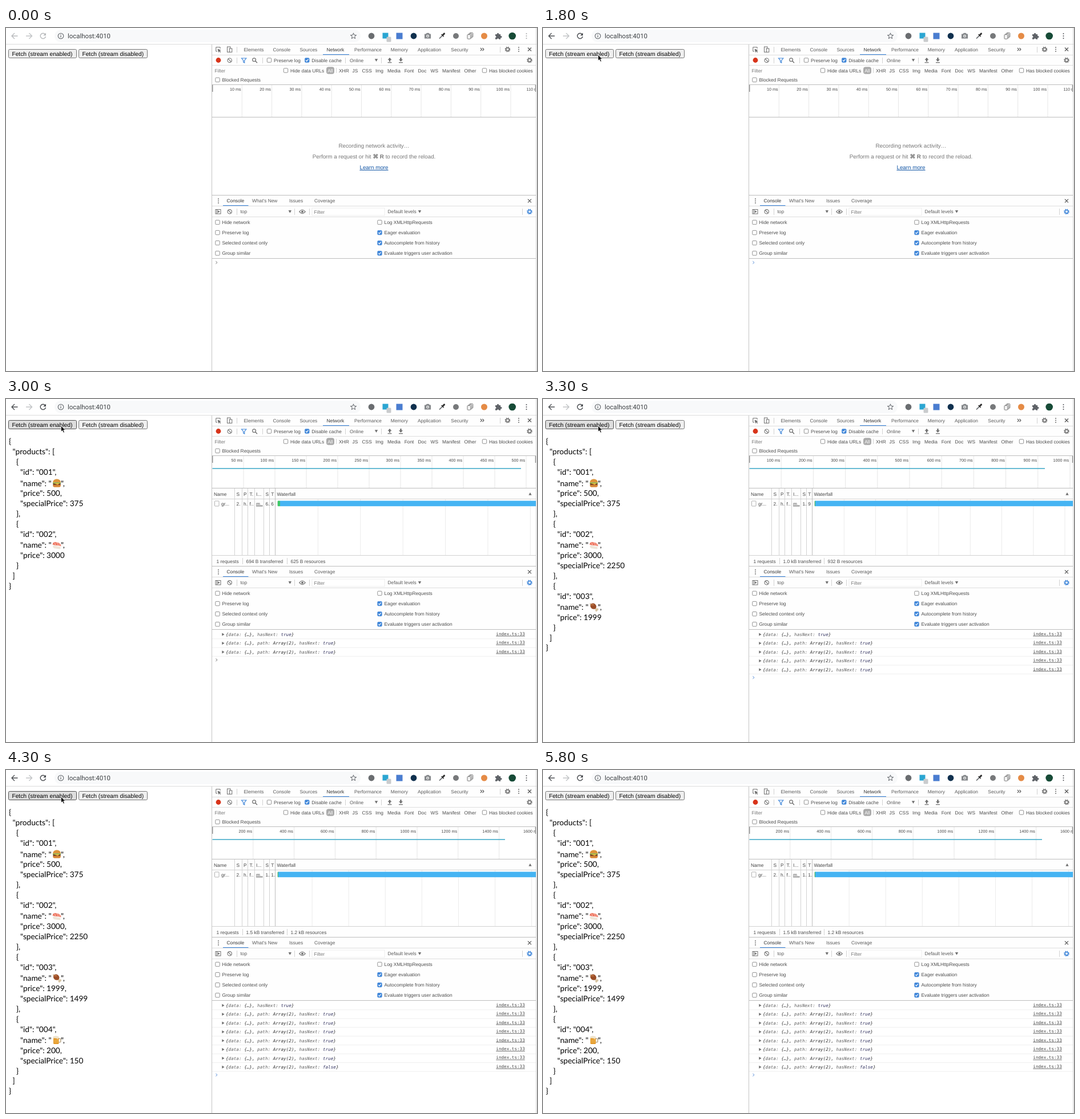
An HTML page for the animation above (6.2 s loop, 930 by 602 pixels).

```html
<!DOCTYPE html>
<html lang="en">
<head>
<meta charset="utf-8">
<title>Streamed fetch</title>
<style>
html, body { margin: 0; width: 100%; height: 100%; overflow: hidden; background: #fff; }
svg { display: block; width: 930px; height: 602px; }
text { font-family: "Liberation Sans", Arial, sans-serif; text-rendering: geometricPrecision; white-space: pre; }
.json { font-family: Lato, "Noto Sans", sans-serif; }
.url { font-family: Roboto, sans-serif; }
.mono { font-family: "DejaVu Sans Mono", monospace; }
</style>
</head>
<body>
<svg id="stage" viewBox="0 0 930 602" xmlns="http://www.w3.org/2000/svg">
  <g id="base"></g>
  <g id="nav" fill="none" stroke-width="1.4"></g>
  <g id="button"></g>
  <g id="net"></g>
  <g id="json"></g>
  <g id="log"></g>
  <path id="cursor" d="M0 0V10.4L2.4 8.2L4.2 12.2L6 11.4L4.3 7.5H7.5Z" stroke="#fff" stroke-width=".8"/>
</svg>
<script>
const LOOP = 6200, BAR = '#fefefe', LINE = '#d2d2d2', ICON = '#6e6e6e', BLUE = '#3f86d9';
const $ = id => document.getElementById(id);

// Drawing helpers
const text = (x, cy, s, size = 8.4, fill = '#5a5a5a', more = '') =>
  `<text x="${x}" y="${cy + size * .36}" font-size="${size}" fill="${fill}" ${more}>${s}</text>`;
const rect = (x, y, w, h, fill, more = '') =>
  `<rect x="${x}" y="${y}" width="${w}" height="${h}" fill="${fill}" ${more}/>`;
const disc = (x, y, r, fill, more = '') =>
  `<circle cx="${x}" cy="${y}" r="${r}" fill="${fill}" ${more}/>`;
const ring = (x, y, r, c, w = 1.1, more = '') =>
  disc(x, y, r, 'none', `stroke="${c}" stroke-width="${w}" ${more}`);
const line = (d, c = ICON, w = 1.1, more = '') =>
  `<path d="${d}" fill="none" stroke="${c}" stroke-width="${w}" ${more}/>`;
const shape = (d, fill = ICON) => `<path d="${d}" fill="${fill}"/>`;
const hline = (y, c = LINE, x = 361, x2 = 928) => line(`M${x} ${y}H${x2}`, c, 1);
const vline = (x, y, y2, c = LINE) => line(`M${x} ${y}V${y2}`, c, 1);

const gear = (x, y, c) => ring(x, y, 2.8, c, 1.6) + ring(x, y, 4.2, c, 1.3, 'stroke-dasharray="1.7 1.6"');
const dots = (x, y, c = ICON, gap = 3.4) => [-gap, 0, gap].map(d => disc(x, y + d, 1, c)).join('');
const cross = (x, y) => line(`M${x - 3} ${y - 3}l6 6m0 -6l-6 6`, '#555', 1.2);
const block = (x, y) => ring(x, y, 3.7, ICON) + line(`M${x - 2.6} ${y - 2.6}l5.2 5.2`);
const down = (x, y) => shape(`M${x - 2.7} ${y - 2.2}h5.4l-2.7 4.6z`);
const check = (x, y, label, on) =>
  rect(x - 3.7, y - 3.7, 7.4, 7.4, on ? BLUE : '#fff', `rx="1.3" stroke="${on ? BLUE : '#767676'}" stroke-width=".8"`) +
  (on ? line(`M${x - 2.2} ${y}l1.6 1.8l2.8 -3.6`, '#fff', 1.2) : '') +
  text(x + 8, y, label, 8.4, '#4c4c4c');
const button = (x, w, label, hot) =>
  rect(x, 37.5, w, 15, hot ? '#dedede' : '#efefef', `rx="2" stroke="${hot ? '#4f4f4f' : '#767676'}" stroke-width="1"`) +
  text(x + 5.9, 45.1, label, 10.25, '#000');

function browserBar() {
  let s = rect(0, 0, 930, 28, '#fff') + rect(85, 3, 536, 22, '#f8f9fa', 'rx="11"') +
    hline(28.5, '#dcdcdc', 0, 930) +
    ring(96, 14, 4.8, '#5f6368', 1.1) + line('M96 13.2v3.4M96 11v1.2', '#5f6368', 1.2) +
    text(108, 14, 'localhost:4010', 11.4, '#3c4043', 'class="url"');
  let star = '';
  for (let i = 0; i < 10; i++) {
    const a = i * Math.PI / 5, r = i % 2 ? 2.3 : 5.4;
    star += (i ? 'L' : 'M') + (608.5 + r * Math.sin(a)).toFixed(2) + ' ' + (14.2 - r * Math.cos(a)).toFixed(2);
  }
  s += line(star + 'Z', '#5f6368', 1);
  s += disc(640, 14, 5.4, '#6a6d70') + rect(659.5, 8.5, 10, 10, '#2ba6d2') +
    rect(666.5, 15.5, 8, 9, '#c9cbcd', 'rx="1.5"') + rect(683.5, 8.5, 11, 11, '#4a7dd0') +
    disc(714, 14, 5.4, '#10304e');
  s += shape('M733 10.5h2.5l1.2 -1.7h4l1.2 1.7h2.2v8h-11.1z', '#85888b') +
    disc(738.6, 14.2, 2.4, '#fff') + disc(738.6, 14.2, 1.2, '#85888b');
  s += line('M759 18.5l5.5 -5.5', '#5f6368', 1.6) + line('M762.5 11l4.2 4.2', '#333', 1.4) +
    line('M765.2 12.2l2.3 -2.3', '#333', 3, 'stroke-linecap="round"');
  s += disc(788, 14, 5, '#77797b');
  for (let i = 2; i >= 0; i--)
    s += rect(808 + i * 2, 11.6 - i * 1.6, 5.8, 7.6, '#f4f4f4', 'rx="1" stroke="#777" stroke-width="1"');
  s += disc(837.5, 14, 5.5, '#e58b46');
  s += shape('M857 11h3v-.7a1.6 1.6 0 0 1 3.2 0v.7h3v3h.8a1.6 1.6 0 0 1 0 3.2h-.8v2.6h-3a1.5 1.5 0 0 0 -3 0h-3.2v-3a1.5 1.5 0 0 0 0 -3z', '#5f6368');
  return s + disc(886.7, 14, 6.3, '#174b37');
}

function devtools() {
  let s = rect(361, 29, 567, 71, BAR) + rect(361, 294, 567, 110, BAR);
  s += vline(360.5, 29, 602, '#c4c4c4') + vline(928.8, 0, 602, '#c8c8c8');
  s += [47.5, 65.5, 312.5, 331.5].map(y => hline(y, '#dedede')).join('');
  s += [99.5, 156.5, 293.5, 404.5].map(y => hline(y, '#bdbdbd')).join('');

  // Main tabs
  s += line('M370 41h-2.2v-7.3h7.3v2.5', ICON, 1) + shape('M370.5 36.5l6.4 2.6l-2.6 1l2 2l-1 1l-2 -2l-1 2.4z') +
    rect(387.5, 33, 5.5, 9.3, 'none', `stroke="${ICON}"`) + rect(391.3, 36, 4.5, 6.3, BAR, `stroke="${ICON}"`) +
    vline(404.5, 33, 43);
  const tabs = { Elements: 416.5, Console: 467.5, Sources: 514.5, Network: 561.5, Performance: 610, Memory: 673.7, Application: 721, Security: 779.3 };
  for (const k in tabs) s += text(tabs[k], 37.5, k, 8.4, k === 'Network' ? '#333' : '#5a5a5a');
  s += rect(555, 46, 46, 1.1, BLUE) + line('M831 35l2.4 2.5l-2.4 2.5M834.5 35l2.4 2.5l-2.4 2.5', '#555') +
    vline(865.5, 33, 43) + gear(878.5, 37.5, ICON) + dots(898, 37.5) + cross(917, 37.5);

  // Network toolbar
  s += disc(372, 56.5, 4.4, '#d8341a') + block(391.7, 56.7) + vline(404.5, 52, 62) +
    line('M412.6 53h8.2l-3.1 4v4l-2 -1.2v-2.8z', BLUE, 1.2) +
    ring(434.6, 55.8, 2.9, ICON, 1.2) + line('M436.8 58l3.2 3.2', ICON, 1.5) + vline(449.5, 52, 62) +
    check(461, 56.5, 'Preserve log') + check(527.3, 56.5, 'Disable cache', true) + vline(594.5, 52, 62) +
    text(602, 56.7, 'Online') + down(648.5, 56.5) + vline(657.5, 52, 62) +
    shape('M672 52l3.4 4h-2.2v3h-2.4v-3h-2.2zM668.5 60h7v1.2h-7z') +
    shape('M691.5 59l3.4 -4h-2.2v-3h-2.4v3h-2.2zM688 60h7v1.2h-7z') + gear(917, 56.5, ICON);

  // Filters
  s += text(365.5, 75, 'Filter', 8.4, '#777') + check(490, 74.5, 'Hide data URLs') +
    rect(561, 68.3, 14, 12.4, '#ababab', 'rx="4"') + text(563.2, 74.5, 'All', 8.4, '#fff') + vline(578.5, 70, 79);
  const kinds = { XHR: 583, JS: 606.5, CSS: 623.5, Img: 647, Media: 668, Font: 697.7, Doc: 721.5, WS: 743.5, Manifest: 764, Other: 802.5 };
  for (const k in kinds) s += text(kinds[k], 74.5, k, 8.4, '#4c4c4c');
  s += check(838, 74.5, 'Has blocked cookies') + check(370.5, 91, 'Blocked Requests');

  // Drawer
  s += dots(372, 303.5) + text(386.5, 303, 'Console', 8.4, '#333') + text(431, 303, "What's New") +
    text(496, 303, 'Issues') + text(540, 303, 'Coverage') + rect(380, 311, 44.5, 1.1, BLUE) + cross(917, 303.3) +
    rect(367, 318.5, 9, 7.6, 'none', `stroke="${ICON}"`) + line('M369.5 318.5v7.6') + shape('M371 320l3.6 2.3l-3.6 2.3z') +
    block(391.7, 322.3) + vline(404.5, 317, 328) + text(410.5, 322.3, 'top') + down(497.3, 322.3) + vline(505.5, 317, 328) +
    line('M513.8 322.3q5 -6.6 10.4 0q-5.2 6.6 -10.4 0z', ICON, 1.2) + disc(519, 322.3, 1.9, ICON) + vline(531.5, 317, 328) +
    rect(536, 316, 127, 13, '#fff', 'stroke="#e8e8e8" stroke-width=".8"') + text(539.5, 322.6, 'Filter', 8.4, '#777') +
    text(668.5, 322.3, 'Default levels') + down(724.5, 322.3) + vline(904.5, 317, 328) + gear(917, 322.3, BLUE);
  ['Hide network', 'Preserve log', 'Selected context only', 'Group similar'].forEach((k, i) =>
    s += check(370.5, 341 + i * 18.1, k));
  ['Log XMLHttpRequests', 'Eager evaluation', 'Autocomplete from history', 'Evaluate triggers user activation'].forEach((k, i) =>
    s += check(654.5, 341 + i * 18.1, k, i > 0));
  return s;
}

// Network panel
const ruler = (unit, gap) => {
  let s = '<clipPath id="clip"><rect x="361" y="100" width="566" height="56"/></clipPath><g clip-path="url(#clip)">';
  for (let i = 1; i * gap < 620; i++) {
    const x = 361 + i * gap;
    s += vline(x.toFixed(1), 100, 156, '#e6e6e6') + text(x - 1.8, 107.3, unit * i + ' ms', 7.2, '#444', 'text-anchor="end"');
  }
  return s + '</g>' + rect(361, 100, 1.5, 12, '#999') + rect(926.7, 100, 1.5, 12, '#999');
};

function idlePanel() {
  const mid = 'text-anchor="middle"';
  return ruler(10, 52.3) + text(644.5, 206, 'Recording network activity…', 9.8, '#777', mid) +
    text(644.5, 225.3, 'Perform a request or hit <tspan font-weight="bold">⌘ R</tspan> to record the reload.', 9.8, '#777', mid) +
    text(644.5, 244.5, 'Learn more', 9.8, '#1155a5', mid + ' text-decoration="underline"');
}

function requestPanel(p) {
  const bar = (x, w, c) => rect(x, 178.6, w, 9.6, c);
  let s = ruler(p.unit, p.gap);
  if (p.unit === 10) s += rect(362, 121.3, 10, 1.3, '#c4c4c4') + rect(372, 121.3, 26, 1.4, '#3fc46e') + rect(398, 121.3, 14, 1.4, '#45aee8');
  else s += rect(361.5, 121.2, p.end - 361.5, 1.6, '#45acca');

  s += rect(361, 157, 567, 18, BAR) + rect(361, 275, 567, 18, BAR) + hline(175.5) + hline(274.5);
  for (let x = 472 + p.grid; x < 927; x += p.grid) s += vline(x.toFixed(1), 176, 274, '#ebebeb');
  [400.5, 413.5, 423.5, 435.5, 451.5, 461.5].forEach(x => s += vline(x, 157, 274));
  s += vline(471.5, 157, 274, '#bdbdbd');

  const cols = [364, 403.5, 416, 426.5, 438, 454.5, 464.3];
  ['Name', 'S', 'P', 'T.', 'I...', 'S', 'T'].forEach((k, i) => s += text(cols[i], 166.5, k, 8.4, '#444'));
  s += text(474.5, 166.5, 'Waterfall', 8.4, '#444') + shape('M915.4 168.7h5.2l-2.6 -4.6z');
  s += rect(365.5, 179, 7.5, 9, '#fff', 'stroke="#aaa" stroke-width=".9" rx=".8"');
  ['gr...', '2.', 'h.', 'f..', 'm..', p.size, p.time].forEach((k, i) =>
    s += text(i ? cols[i] : 377, 183.5, k, 8.4, '#444', i === 4 ? 'text-decoration="underline"' : ''));

  if (p.unit === 10)
    s += rect(475, 181, 9.5, 5, '#fff', 'stroke="#ddd" stroke-width=".8"') + rect(485, 181, 1, 5, '#999') +
      bar(487, 19.5, '#3dcb68') + bar(506.5, 13.5, '#45b4f3');
  else
    s += rect(475.3, 179.5, 1, 8, '#bbb') + bar(476, p.green, '#3dcb68') + bar(476 + p.green, 452 - p.green, '#45b4f3');

  return s + text(368.5, 284.5, '1 requests', 8.4, '#4c4c4c') + vline(414.5, 279, 290) +
    text(420.5, 284.5, p.sent + ' transferred', 8.4, '#4c4c4c') + vline(492.5, 279, 290) +
    text(498.5, 284.5, p.body + ' resources', 8.4, '#4c4c4c');
}

// Food pictures, drawn around 0,0
const food = [
  shape('M-7 -1C-6.5 -9 6.5 -9 7 -1z', '#dd943a') + rect(-7.2, -1.2, 14.4, 2, '#7dab3c', 'rx="1"') +
    rect(-6.8, .6, 13.6, 2.7, '#6c3a20', 'rx="1.3"') + shape('M-5 .4h10l-3.5 2.4z', '#f5c242') +
    shape('M-7 3.2h14q0 4 -3 4h-8q-3 0 -3 -4z', '#d9893a'),
  shape('M-6 0L6 3q1.5 2 -.5 4L-5 5.5q-3 -2.5 -1 -5.5z', '#eee6da') +
    shape('M-7.5 -1q1 -5 6 -4.2l5 1.2q4 1.5 4 6.2q-3 -1.6 -6 -1.6t-9 -1.6z', '#ee7763') +
    line('M-4 -4.6l2 4.6M0 -4.4l2.5 4.6M3.5 -3.4l2.4 4', '#fbc5b4', 1),
  line('M-5.8 -5.4L5.5 5', '#d8c5a4', 2.8, 'stroke-linecap="round"') + disc(6.2, 3.9, 1.9, '#d8c5a4') +
    disc(4.4, 5.8, 1.9, '#d8c5a4') + '<ellipse cx="-1.6" cy="-.6" rx="5.6" ry="4.8" fill="#9a4d27" transform="rotate(40)"/>' +
    line('M-4.6 -3.2q2.4 -2 4.6 -.4', '#cf8650', 1.4),
  line('M3.2 -2.5h2.4q1.2 0 1.2 1.2v3.6q0 1.4 -1.4 1.4h-2', '#bba98a', 1.6) + rect(-6, -4, 9.5, 11, '#e39a2c', 'rx="1.2"') +
    line('M-3.6 -1v6M-1.2 -1v6M1.2 -1v6', '#f3bd58', 1) +
    shape('M-6.6 -3.6q-.4 -3.4 3 -3.4q2 -1.2 4 0q3.6 0 3.4 3.4l-2 .6v1.6h-1.6v-1.6z', '#efe5cf')
];
const goods = [[500, 375], [3000, 2250], [1999, 1499], [200, 150]];

// Each product takes two chunks: first the item, then its special price
function jsonView(chunks) {
  if (!chunks) return '';
  const row = (x, y, s) => text(x, y, s, 13.6, '#000', 'class="json"');
  const count = Math.ceil(chunks / 2);
  let y = 74.3, s = row(5, y, '{') + row(11.5, y + 18, '"products": [');
  y += 36;
  for (let i = 0; i < count; i++) {
    const top = y, [price, special] = goods[i], full = chunks >= 2 * i + 2;
    s += row(18, y, '{') + row(25, y + 18, `"id": "00${i + 1}",`) + row(25, y + 37.5, '"name": "') +
      `<g transform="translate(89 ${y + 37.3})">${food[i]}</g>` + row(96, y + 37.5, '",') +
      row(25, y + 55.2, `"price": ${price}${full ? ',' : ''}`);
    if (full) s += row(25, y + 73, `"specialPrice": ${special}`);
    y = top + (full ? 91 : 73);
    s += row(18, y, i < count - 1 ? '},' : '}');
    y += 17.8;
  }
  return s + row(11.5, y, ']') + row(5, y + 17.8, '}');
}

function logView(chunks, active) {
  const step = 15.45, dim = k => `<tspan fill="#5f5f5f">${k}:</tspan> `;
  let s = '';
  for (let i = 0; i < chunks; i++) {
    const y = 413.2 + i * step;
    s += shape(`M378.3 ${y - 2.6}l4.2 2.6l-4.2 2.6z`) +
      text(385, y, '{' + dim('data') + '{…}, ' + (i ? dim('path') + 'Array(2), ' : '') + dim('hasNext') +
        `<tspan fill="#32325f">${i < 7}</tspan>}`, 7.64, '#303030', 'class="mono" font-style="italic"') +
      text(858.3, y - 1.2, 'index.ts:33', 7.64, '#4a4a4a', 'class="mono" text-decoration="underline"') +
      hline((y + 7.6).toFixed(1), '#efefef');
  }
  const y = 411.6 + chunks * step;
  return s + line(`M367.4 ${y - 2.3}l2.6 2.3l-2.6 2.3`, active ? '#5b8fd8' : '#777', 1);
}

const steps = [
  { at: 2600, chunks: 0, unit: 10, gap: 52.3, end: 412, grid: 45.75, size: '3.', time: '8', sent: '375 B', body: '155 B' },
  { at: 2700, chunks: 1 },
  { at: 2800, chunks: 2, unit: 50, gap: 86, end: 859, grid: 74.4, green: 5, size: '5.', time: '3.', sent: '535 B', body: '390 B' },
  { at: 3000, chunks: 3, gap: 55, end: 902, green: 4, size: '6.', time: '6', sent: '694 B', body: '625 B' },
  { at: 3100, chunks: 4, unit: 100, gap: 71.8, end: 863, grid: 60, green: 2, size: '8.', time: '7', sent: '849 B', body: '779 B' },
  { at: 3300, chunks: 5, gap: 56.2, end: 879, grid: 55.25, green: 1, size: '1.', time: '9', sent: '1.0 kB', body: '932 B' },
  { at: 3500, chunks: 6, unit: 200, gap: 95, end: 876, grid: 76, time: '1.', sent: '1.2 kB', body: '1.0 kB' },
  { at: 3700, chunks: 7, gap: 82, end: 875, grid: 70, sent: '1.3 kB', body: '1.1 kB' },
  { at: 3900, chunks: 8, gap: 71.8, end: 874, grid: 64.1, sent: '1.5 kB', body: '1.2 kB' }
];
for (let i = 1; i < steps.length; i++) steps[i] = { ...steps[i - 1], ...steps[i] };

// Pointer: enters, rests on the first button, leaves
const rest = [96.4, 47];
function pointer(t) {
  const mix = (a, b, k) => a.map((v, i) => v + (b[i] - v) * k);
  if (t < 1300 || t >= 4800) return null;
  if (t < 1700) return mix([925, 596], rest, 1 - (1 - (t - 1200) / 500) ** 3);
  if (t < 4500) return rest;
  return mix(rest, [930, 330], ((t - 4400) / 400) ** 2);
}

$('base').innerHTML = browserBar() + devtools() + button(127.5, 120, 'Fetch (stream disabled)');

let last = '';
function draw(t) {
  const focus = t >= 1300, hot = t >= 2000 && t < 4500;
  const n = steps.filter(p => p.at <= t).length, p = steps[n - 1];
  const key = [focus, hot, n].join();
  if (key !== last) {
    last = key;
    const chunks = p ? p.chunks : 0, ink = focus ? '#4c4f53' : '#b9bbbd';
    $('nav').innerHTML = line('M20.5 14H10.5M15 9l-5 5l5 5', ink, 1.4) + line('M35 14h10M40.5 9l5 5l-5 5', '#c2c4c6', 1.4) +
      line('M68.6 11A4.7 4.7 0 1 0 69.5 15', ink, 1.4) + shape('M70 8.5v4.8h-4.8z', ink) +
      dots(911.5, 14, focus ? '#4c4f53' : '#a5a7a9', 4);
    $('button').innerHTML = button(4.5, 119, 'Fetch (stream enabled)', hot);
    $('net').innerHTML = p ? requestPanel(p) : idlePanel();
    $('json').innerHTML = jsonView(chunks);
    $('log').innerHTML = logView(chunks, focus && chunks !== 3);
  }
  const at = pointer(t);
  $('cursor').setAttribute('visibility', at ? 'visible' : 'hidden');
  if (at) $('cursor').setAttribute('transform', `translate(${at})`);
}

const start = performance.now();
function tick() {
  const t = (performance.now() - start) % LOOP;
  draw(Math.floor(t / 100) * 100);
  requestAnimationFrame(tick);
}
tick();
</script>
</body>
</html>
```
